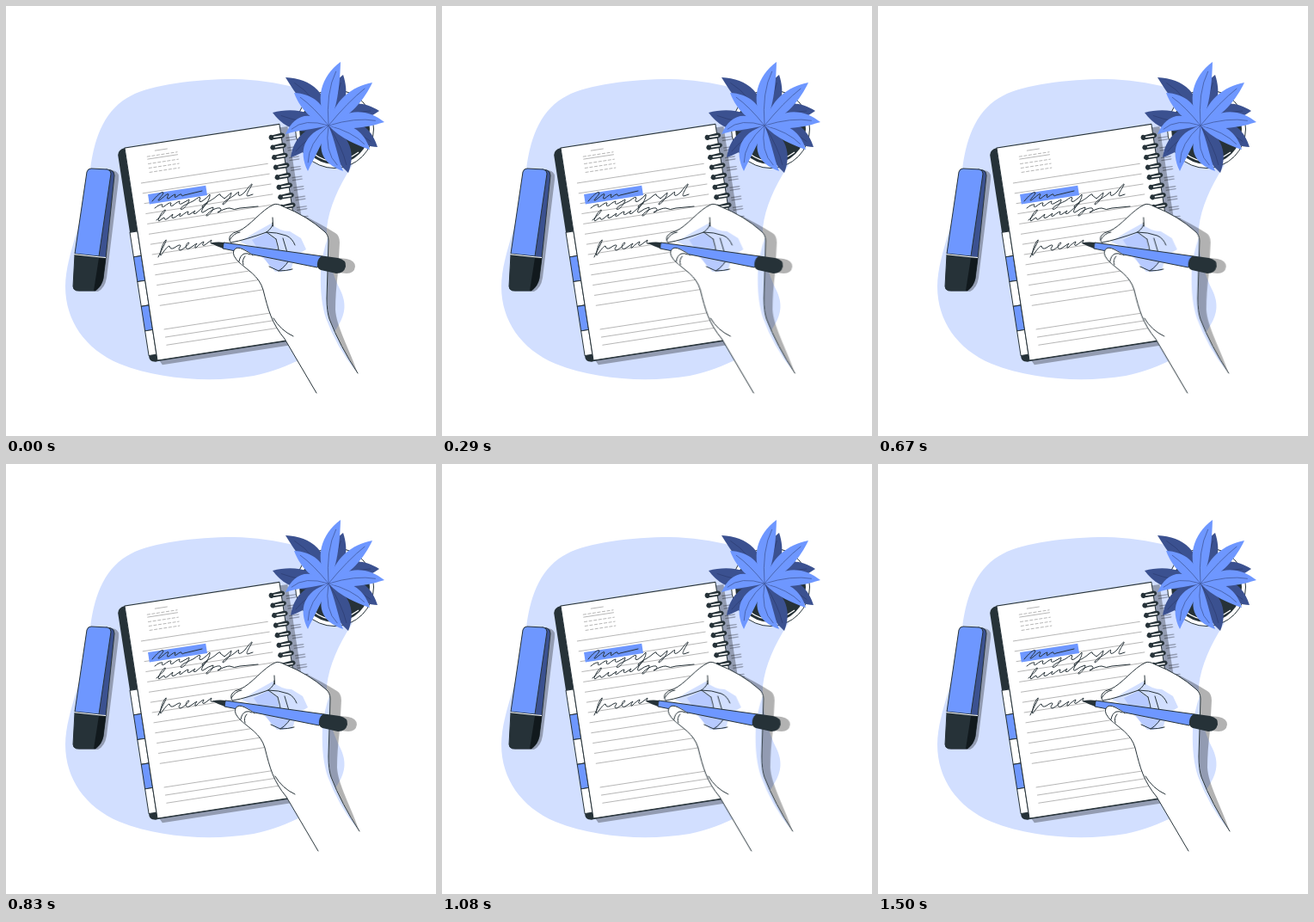
These frames come from a looping animation (500 px wide and 500 px high, 1540 ms). An HTML page:

```html
<!DOCTYPE html>
<html lang="en">
<head>
<meta charset="utf-8">
<title>Writing hand</title>
<style>
  html, body { margin: 0; width: 100%; height: 100%; overflow: hidden; background: #fff; }
  svg { display: block; width: 100vw; height: 100vh; }
  .ink { fill: none; stroke: #263238; stroke-width: 1; stroke-linecap: round; stroke-linejoin: round; }
  .dark { fill: #263238; }
  .blue { fill: #6e97ff; }
  .navy { fill: #3b5190; }
  .pale { fill: #d2dfff; }
  .white { fill: #fff; }
  .shade { fill: #000; opacity: .3; }
  .edge { stroke: #263238; stroke-width: 1; stroke-linejoin: round; }
  .rule { fill: none; stroke: #a9a9a9; stroke-width: .8; }
</style>
</head>
<body>
<svg viewBox="0 0 500 500">
  <path class="pale" d="M98 190C103 150 116 119 146 104C168 92 220 85 265 85C315 86 363 99 397 119C421 134 417 163 401 188C387 210 376 233 373 258C371 287 379 311 390 333C397 350 393 362 383 377C367 402 329 421 288 430C240 438 180 435 132 416C92 399 69 366 69 326C70 285 92 250 98 190Z"/>

  <g id="marker">
    <path class="shade" d="M120 190L127 192Q132 194 131 202L117 316Q115 328 107 332L84 332Z"/>
    <path class="navy edge" d="M116 190L122 191Q126 192 126 197L116 293L106 291Z"/>
    <path class="blue edge" d="M94 193Q95 189 99 189L118 190Q122 191 122 195L108 291L80 288Z"/>
    <path class="dark edge" d="M80 289L116 293L113 317Q111 326 104 331L82 331Q78 330 78 326Z"/>
    <path d="M108 293L116 293.500L113 317Q111 326 104 331L102 331Z" fill="#11191d"/>
    <path d="M80 288.800L108 291.800L116 292.500" fill="none" stroke="#fff" stroke-width="1"/>
  </g>

  <g id="book" transform="translate(138 165) rotate(-8.75)">
    <path class="shade" d="M182 4H191V256H5L2 250H182Z"/>
    <path class="dark" d="M0 0Q-8 1-9 7V98H0ZM-9 243V246Q-8 251-2 251H2V243Z"/>
    <g id="tabs"></g>
    <path class="white edge" d="M0 0H182V250H0Z"/>
    <path class="ink" d="M-3 250.500H182" stroke-width="1.600"/>
    <path class="rule" d="M34 8.500H49M24 17H60"/>
    <path class="rule" stroke-dasharray="4 1.600" d="M24 14H60M24 22.500H60M24 27.500H60M24 32.500H60"/>
    <path class="rule" id="rules"/>
    <path class="blue" d="M18.500 57.500H86.500V69H18.500Z"/>
    <g id="rings"></g>
  </g>

  <g class="ink">
    <path d="M170 227C175 221 181 215 183 217C183 220 174 227 178 226C184 222 188 217 189 219Q186 225 189 224Q195 219 197 219Q195 224 198 222Q203 218 204 219Q204 222 207 220L228 215"/>
    <path d="M173 235Q179 230 182 231Q180 235 184 233Q190 228 192 229Q190 234 194 232Q200 227 202 227Q200 231 204 230L213 225C213 230 204 239 203 236C204 232 214 229 219 226Q225 221 226 223Q223 229 228 227Q234 223 237 219C238 226 227 237 228 233C231 229 240 226 245 221Q250 217 249 220L254 224L262 217C262 223 251 234 252 230C255 225 263 223 268 218Q272 214 270 219Q271 223 278 216C283 209 287 205 286 208C283 213 278 221 281 221L287 219"/>
    <path d="M175 249C181 244 187 237 185 237C181 239 175 250 178 250Q183 246 184 246Q184 250 188 247L194 242Q191 248 196 246L203 241Q200 246 204 244Q210 239 212 239Q210 244 214 242L220 238Q216 243 221 241C228 235 236 228 234 229C230 232 225 241 229 240Q236 235 241 234C241 239 232 247 233 243C237 238 245 234 249 235Q252 238 246 240Q255 235 260 235Q265 238 272 235L293 233"/>
    <path d="M177 292C181 283 188 271 186 272C182 275 178 290 180 290C183 286 187 280 190 279Q191 284 196 281Q203 276 203 279Q199 284 203 284C209 281 215 275 212 275C208 278 208 284 213 282L222 276Q218 282 221 281Q227 275 230 274Q227 280 231 278L239 272Q236 278 242 276"/>
  </g>

  <g id="plant">
    <circle class="white edge" cx="382" cy="143" r="45.500"/>
    <circle class="dark" cx="382" cy="143" r="41"/>
    <path d="M358 172Q382 190 410 170" fill="none" stroke="#fff" stroke-width="1.200"/>
  </g>

  <g id="hand">
    <path class="shade" d="M345 243Q367 254 383 264Q388 267 388 275L387 293L396 294Q406 296 406 303Q405 311 396 311L386 310Q383 334 383 353C384 372 398 396 409 427L388 392L372 360V265Z"/>
    <path class="white" d="M361 450L324 387C309 369 305 354 299 330C294 313 280 307 270 297L263 286L270 280L261 275Q257 268 265 264C282 258 296 238 311 231Q315 229 322 233Q350 244 370 262Q375 266 375 273L373 340Q373 355 376 364Q388 395 409 427Z"/>
    <path class="pale" d="M375 267Q367 289 366 308C365 333 368 351 372 363Q384 396 407 425L389 393L375 363L373 340Z"/>
    <path class="pale" d="M290 263L308 253Q318 262 330 262L343 270L349 283L336 291L331 308L313 309L302 296L285 280L272 274Z"/>
    <path d="M286 272L303 264L313 271L318 291L332 292L320 309L308 304L298 290Z" fill="#b7caff"/>
    <g class="ink">
      <path d="M361 450L324 387C309 369 305 354 299 330C294 313 280 307 270 297"/>
      <path d="M262 276Q258 271 261 267Q264 263 270 262C284 256 297 237 311 231Q315 229 322 233Q350 244 370 262Q375 266 375 273L373 340Q373 355 376 364Q388 395 409 427"/>
      <path d="M310 246L310.500 256M260 272Q265 264 272 263M262 275Q278 272 303 263Q311 257 310 252M303 263Q315 263 326 267Q333 270 336 278M303 263L314 271M314 271Q317 280 318 291M322 270L328 290M333 289Q326 303 317 308L306 303M317 308Q326 308 333 306M311 363Q319 377 334 384"/>
    </g>
    <path class="blue edge" d="M253 275L368 291L362 304L252 282Z"/>
    <path class="dark" d="M237.500 275.500Q246 274 253.500 275L252.500 282Q244 279 237.500 275.500Z"/>
    <path class="dark" d="M368 290.500L386 293Q396 295 395 303Q393 311 384 311L366 307Q361 305 362 299Q363 292 368 290.500Z"/>
    <path class="white" d="M265 287Q264 281 271 281Q280 283 287 290Q295 301 293 313Q283 307 270 297Z"/>
    <path class="ink" d="M272 299Q262 290 265 284Q268 279 276 283Q284 287 287 290M271 297Q272 290 277 288Q281 287 284 289M276 301Q274 295 278 291"/>
  </g>
</svg>
<script>
  const $ = id => document.getElementById(id);
  function add(parent, d, cls) {
    const p = document.createElementNS('http://www.w3.org/2000/svg', 'path');
    p.setAttribute('d', d);
    p.setAttribute('class', cls);
    $(parent).append(p);
    return p;
  }

  for (let i = 0; i < 5; i++)
    add('tabs', `M-9 ${98 + 29 * i}H0V${127 + 29 * i}H-9Z`, (i % 2 ? 'blue' : 'white') + ' edge');

  let rules = '';
  for (let i = 0; i < 13; i++) rules += `M12.5 ${43.4 + 12 * i}H162`;
  for (const y of [215.5, 224.7, 234]) rules += `M13 ${y}H162`;
  $('rules').setAttribute('d', rules);

  for (let i = 0; i < 9; i++) {
    const y = 13.5 + 11.7 * i;
    add('rings', `M187 ${y + 3}h11q3 .7 0 1.4h-11zM187 ${y + 6}h11q3 .7 0 1.4h-11z`, 'shade');
    add('rings', `M172 ${y - 2}a3 3 0 1 0 0 5h11q4-1 3-4q-1-2-4-2z`, 'dark');
    add('rings', `M173 ${y - .3}h10q1 .8 0 1.6h-10z`, 'white');
  }

  // Each leaf: tip x, tip y, width, sideways bend (positive is counter-clockwise)
  const back = [[325, 83, 17, -9], [310, 124, 17, 3], [392, 80, 16, 0], [434, 122, 17, 7],
    [432, 164, 17, 7], [398, 194, 16, 4], [331, 176, 14, -4]];
  const front = [[423, 167, 12, 6], [335, 101, 14, -3], [325, 149, 12, -11], [351, 192, 13, -10],
    [392, 192, 13, -11], [440, 135, 14, 6], [426, 89, 14, 3], [389, 65, 15, 8]];
  function leaf([x, y, w, bend], cls, vein) {
    const cx = 375, cy = 139, dx = x - cx, dy = y - cy, len = Math.hypot(dx, dy);
    const at = (f, side) => `${cx + dx * f + dy / len * side} ${cy + dy * f - dx / len * side}`;
    add('plant', `M${cx} ${cy}C${at(.35, bend + w)} ${at(.72, bend + w * .75)} ${x} ${y}` +
      `C${at(.72, bend - w * .75)} ${at(.35, bend - w)} ${cx} ${cy}Z`, cls);
    const line = add('plant', `M${cx} ${cy}Q${at(.5, bend * 1.3)} ${at(.84, bend * .4)}`, 'ink');
    line.style.stroke = vein;
    line.style.strokeWidth = .7;
  }
  back.forEach(l => leaf(l, 'navy', '#2c3c70'));
  front.forEach(l => leaf(l, 'blue', '#3b5190'));

  // Shake drawn at 24 steps per second, with a short rest at the end of the loop
  const LOOP = 1540, FPS = 24, STEPS = 36;
  const shake = $('hand').animate(
    [0, -1, 2, -4, 4, -4, 4, -4, 2, -1, 0].map(x => ({ transform: `translateX(${x * .67}px)`, easing: 'ease' })),
    { duration: STEPS / FPS * 1000, fill: 'both' });
  shake.pause();
  function tick() {
    const step = Math.floor((performance.now() % LOOP + 4) * FPS / 1000);
    shake.currentTime = Math.min(step, STEPS) * 1000 / FPS;
    requestAnimationFrame(tick);
  }
  tick();
</script>
</body>
</html>
```
